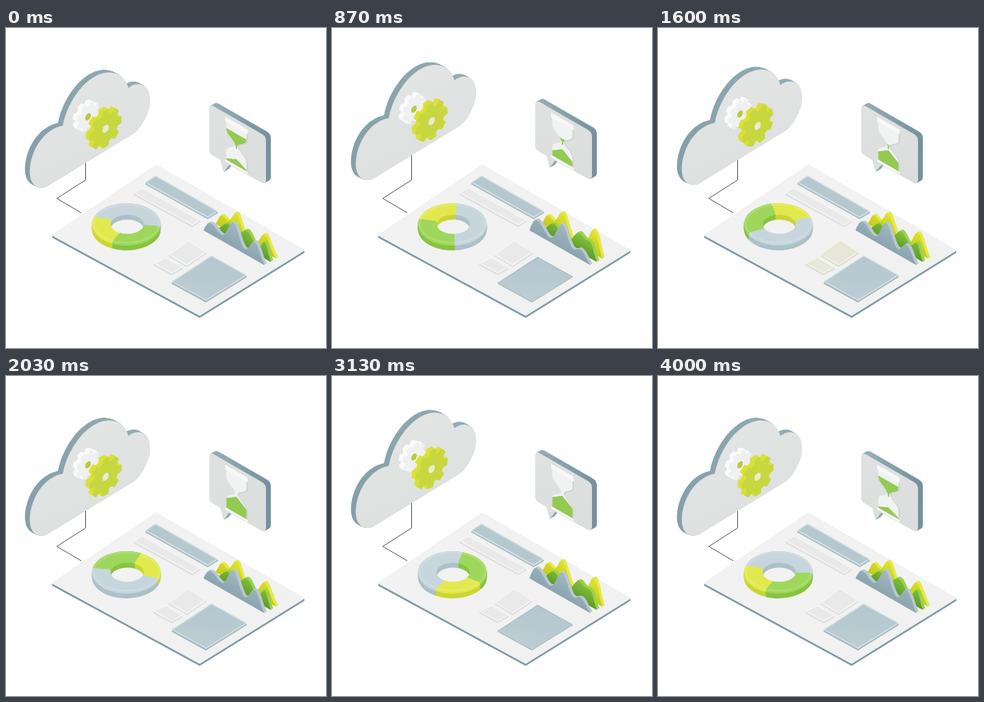
Recreate the animation shown at these times as an HTML page with a canvas. Size 400 by 400 pixels, loop 4.03 s.

```html
<!DOCTYPE html>
<html>
<head>
<meta charset="utf-8">
<style>
html, body { margin: 0; width: 100%; height: 100%; overflow: hidden; background: #fff; }
canvas { display: block; }
</style>
</head>
<body>
<canvas id="stage" width="400" height="400"></canvas>
<script>
const c = document.getElementById('stage').getContext('2d');
const LOOP = 4030, HALF = LOOP / 2, TAU = Math.PI * 2;
const BLUE = ['#c6d6dc', '#acc0c8'], GREEN = ['#9fd75c', '#86c440'], YELLOW = ['#e2e94e', '#ccd536'];

const cloud = new Path2D('M50 199C36 203 28 192 30 174C33 148 50 126 71 122C77 90 102 57 127 55.5C142 55 150 64 153 75C160 69 172 68 177 77C182 86 181 100 175 111C171 120 166 128 158 133Z');
const bubble = new Path2D('M254 102Q254 95 260 98L319 132Q325 135 325 141V189Q325 196 319 193L279 171L272 180L268 165L258 159Q254 157 254 152Z');
const glass = new Path2D('M-14.5 -23V-14C-14.5 -7 -2 -5 -2 0C-2 5 -14.5 7 -14.5 14V25H14.5V14C14.5 7 2 5 2 0C2 -5 14.5 -7 14.5 -14V-23Z');

const clamp = x => Math.max(0, Math.min(1, x));
const ease = x => (x = clamp(x), x * x * (3 - 2 * x));
const mix = (a, b, k) => a + (b - a) * k;
// Rises from 0 to 1 after start, returns to 0 before end
const pulse = (t, start, end, fade = 130) =>
  ease((t - start) / fade) * (1 - ease((t - end + fade) / fade));
const twice = (t, start, end) => pulse(t, start, end) + pulse(t, start + 2160, end + 2160);

function gradient(x0, y0, x1, y1, from, to) {
  const g = c.createLinearGradient(x0, y0, x1, y1);
  g.addColorStop(0, from);
  g.addColorStop(1, to);
  return g;
}

function extrude(path, depth, dx, dy, side, front) {
  c.fillStyle = side;
  for (let d = depth; d > 0; d -= .5) {
    c.save();
    c.translate(d * dx, d * dy);
    c.fill(path);
    c.restore();
  }
  c.fillStyle = front;
  c.fill(path);
}

function poly(points) {
  const p = new Path2D();
  points.forEach(([x, y]) => p.lineTo(x, y));
  p.closePath();
  return p;
}

function slab(points, color, side, edge, press = 0, alpha = 1) {
  const path = poly(points);
  c.save();
  c.globalAlpha = alpha;
  c.translate(0, press);
  c.lineWidth = 2;
  c.strokeStyle = side;
  c.save();
  c.translate(0, 2 - press);
  c.stroke(path);
  c.restore();
  c.fillStyle = color;
  c.fill(path);
  c.strokeStyle = edge;
  c.globalAlpha = alpha * (1 - press / 2);
  c.lineWidth = 1.4;
  c.stroke(path);
  c.restore();
}

function drawBoard() {
  const path = poly([[188, 172], [371.5, 278], [242, 358.5], [59, 259]]);
  c.lineWidth = 2.5;
  for (let d = 2.5; d >= 0; d -= .5) {
    c.fillStyle = c.strokeStyle = d ? '#7f99a3' : gradient(190, 170, 240, 360, '#f2f2f2', '#f1f1f1');
    c.save();
    c.translate(0, d);
    c.fill(path);
    c.stroke(path);
    c.restore();
  }
}

function drawTiles(t) {
  const tile = (points, lit) => {
    slab(points, '#e9e9e9', '#dfe0e0', '#f5f5f5');
    slab(points, '#cbd83e', '#c3ce50', '#d5df5a', 0, lit);
  };
  slab([[187, 185], [264, 229], [252, 236], [175, 193]],
    '#b5c8d0', '#a9bcc5', '#d2dfe4', 2 * twice(t, 350, 850));
  tile([[170, 200], [242, 240], [233, 246], [160, 206]], .85 * twice(t, 300, 800));
  tile([[228, 266], [250, 280], [226, 296], [204, 283]], twice(t, 1080, 1625));
  tile([[199, 287], [220, 299], [207, 306], [185, 294]], .8 * twice(t, 1130, 1625));
  slab([[257, 285], [300, 309], [250, 340], [208, 317]],
    gradient(257, 285, 250, 340, '#b4c7cf', '#bccdd3'), '#a5b9c2', '#d0dde2', 2 * twice(t, 660, 1210));
}

function drawDonut(turn) {
  const parts = [[8, 115, GREEN], [115, 200, YELLOW], [200, 368, BLUE]];
  for (let d = 8; d >= 0; d--) {
    const grow = d ? 0 : -1;
    for (const [from, to, color] of parts) {
      const a = from / 360 * TAU + turn, b = to / 360 * TAU + turn;
      c.beginPath();
      c.ellipse(150.5, 244 + d, 43 + grow, 26 + grow, 0, a, b);
      c.ellipse(151.5, 244 + d, 21 - grow, 12.5 - grow, 0, b, a, true);
      c.fillStyle = color[d > 2 ? 1 : 0];
      c.fill();
    }
  }
  c.strokeStyle = 'rgba(255,255,255,.15)';
  c.lineWidth = 2;
  c.beginPath();
  c.ellipse(150.5, 244.5, 41, 24, 0, 0, TAU);
  c.stroke();
}

function drawWave(x, y, peaks, low, high, side) {
  const path = new Path2D();
  path.moveTo(x, y);
  for (let u = 0; u <= 1.001; u += .0125) {
    const ends = Math.sqrt(clamp(u / .07) * clamp((1 - u) / .07));
    const h = peaks.reduce((sum, [at, top, w]) => sum + top * Math.exp(-(((u - at) / w) ** 2) / 2), 0);
    path.lineTo(x + 76 * u, y + 43.5 * u - h * ends);
  }
  path.closePath();
  // Shade runs at right angles to the sloping base
  extrude(path, 3, 1, -.6, side, gradient(x, y, x + 12, y - 21, low, high));
}

function drawChart(k) {
  drawWave(262, 245, [[.11, 15, .07], [.34, mix(28, 29, k), .08], [mix(.81, .86, k), mix(22, 30, k), .08]],
    '#c3cb1c', '#dfe32c', '#e6e94a');
  drawWave(255, 249, [[.3, 17, .1], [mix(.61, .72, k), mix(22, 24, k), .1], [.9, mix(20, 15, k), .06]],
    '#5d9a2a', '#8ccb3c', '#9bd250');
  drawWave(247, 253, [[.13, mix(14, 18, k), .11], [mix(.49, .54, k), 31, .09], [.84, mix(22, 12, k), .08]],
    '#8ba4b0', '#a0b6c0', '#b9c9d0');
}

function gearPath(teeth, r, turn) {
  const points = [];
  for (let i = 0; i < teeth; i++)
    for (const [off, k] of [[-.32, .77], [-.2, 1], [.2, 1], [.32, .77]]) {
      const a = (i + off) / teeth * TAU + turn;
      points.push([Math.cos(a) * r * k, Math.sin(a) * r * k]);
    }
  return poly(points);
}

function drawGear(x, y, r, turn, front, side, hole, holeR) {
  const path = gearPath(8, r, turn);
  for (let d = 5; d >= 0; d -= .5) {
    c.save();
    c.transform(.866, -.5, 0, 1, x - d, y - d * .55);
    c.fillStyle = c.strokeStyle = d ? side : front;
    c.lineWidth = 1.5;
    c.fill(path);
    c.stroke(path);
    if (!d) {
      c.beginPath();
      c.arc(0, 0, holeR, 0, TAU);
      c.fillStyle = hole;
      c.fill();
    }
    c.restore();
  }
}

function drawCloud(t) {
  const turn = t / HALF * TAU / 4;
  c.save();
  c.translate(0, -5 + 5 * Math.cos(t / HALF * TAU));
  extrude(cloud, 6, -1, -.55, gradient(25, 0, 160, 0, '#849faa', '#93abb5'),
    gradient(60, 80, 110, 190, '#e3e4e4', '#dedfdf'));
  drawGear(102.5, 111, 16, -turn + .35, '#eff0f0', '#fafafa', '#b9c83a', 4);
  drawGear(124.5, 126, 22.5, turn, '#c8d740', '#d9e136', '#e9ecd8', 4.5);
  c.restore();
}

function drawHourglass(t) {
  const spin = Math.PI * ease((t - 3270) / 430);
  const p = t < 3700 ? clamp((t + 330) / 2280) : (t - 3700) / 2280;
  c.save();
  c.transform(.87, .5, 0, 1, 288, 147);
  c.rotate(t < 3700 ? spin : 0);
  c.fillStyle = '#d0d3d3';
  c.save();
  c.translate(2, 0);
  c.fill(glass);
  c.restore();
  c.fillStyle = '#f1f2f2';
  c.fill(glass);

  c.save();
  c.clip(glass);
  c.fillStyle = '#93ca52';
  const level = -1 - 22 * (1 - p) ** 3;
  if (p < 1) {
    c.fillRect(-15, level, 30, -level);
    c.fillRect(-1, 0, 2, 4);
  }
  const side = 25 - 12 * p, top = 25 - 21 * Math.sqrt(p);
  c.fill(poly([[-15, 26], [-15, side], [0, top], [15, side], [15, 26]]));
  c.restore();

  c.fillStyle = '#f8f8f8';
  c.fillRect(-16, -28, 32, 6);
  c.fillRect(-16, 25, 32, 3);
  c.restore();
}

function drawBubble(t) {
  const phase = t % HALF;
  c.save();
  c.translate(0, phase < 1300 ? -7 * Math.sin(Math.PI * phase / 1300) ** 2 : 0);
  extrude(bubble, 6, 1, -.55, gradient(260, 130, 331, 130, '#93abb5', '#748f9b'),
    gradient(260, 100, 310, 190, '#e0e1e1', '#dcdddd'));
  drawHourglass(t);
  c.restore();
}

function drawCable() {
  c.strokeStyle = '#59645f';
  c.lineWidth = 1;
  c.beginPath();
  c.moveTo(99.5, 150);
  c.lineTo(99.5, 190);
  c.lineTo(63.5, 213);
  c.lineTo(94, 231);
  c.stroke();
}

function frame(now) {
  const t = now % LOOP;
  c.fillStyle = '#fff';
  c.fillRect(0, 0, 400, 400);
  c.lineJoin = 'round';
  drawBoard();
  drawTiles(t);
  drawDonut(t / LOOP * TAU);
  drawChart((1 - Math.cos(t / HALF * TAU)) / 2);
  drawCable();
  drawCloud(t);
  drawBubble(t);
  requestAnimationFrame(frame);
}
requestAnimationFrame(frame);
</script>
</body>
</html>
```
